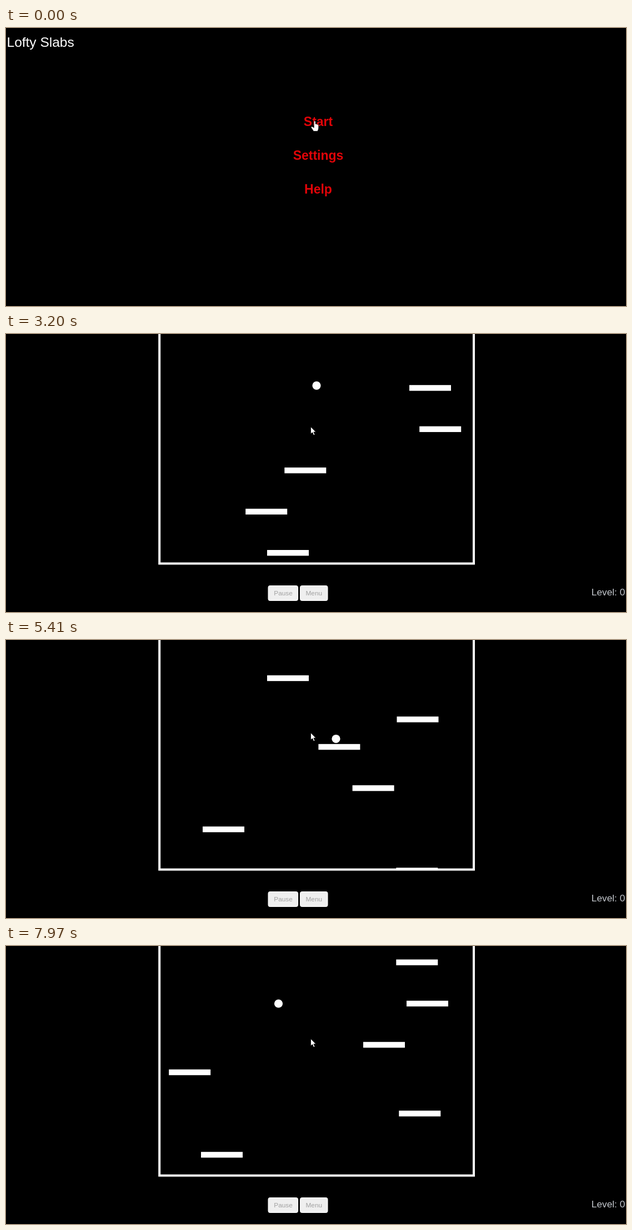
An HTML page for the animation above (8 s loop, 1116x502 px).

```html
<!DOCTYPE html>
<html lang="en">
<head>
<meta charset="utf-8">
<title>Lofty Slabs</title>
<style>
  html, body { margin: 0; width: 100%; height: 100%; overflow: hidden; background: #000; }
  svg { display: block; width: 1116px; height: 502px; }
  text { font-family: "Liberation Sans", Arial, sans-serif; }
  .title { font-size: 24.5px; fill: #fff; }
  .link { font-size: 23px; font-weight: bold; fill: #e00408; text-anchor: middle; }
  .button { fill: #efefef; stroke: #fff; }
  .label { font-size: 11.8px; fill: #a0a0a0; text-anchor: middle; }
  .level { font-size: 17.3px; fill: #c4c8ce; }
  .cursor { fill: #fff; stroke: #000; stroke-width: .8; }
</style>
</head>
<body>
<svg viewBox="0 0 1116 502">
  <clipPath id="field"><rect x="278" y="0" width="562" height="414"/></clipPath>

  <g id="menu">
    <text class="title" x="1.5" y="34">Lofty Slabs</text>
    <text class="link" x="562" y="176.5">Start</text>
    <text class="link" x="562" y="238">Settings</text>
    <text class="link" x="562" y="299">Help</text>
  </g>

  <g id="game">
    <g clip-path="url(#field)">
      <g id="bars" fill="#fff"></g>
      <circle id="ball" r="7.6" fill="#fff"/>
    </g>
    <path d="M276.2 0V414.6H842V0" fill="none" stroke="#fff" stroke-width="4"/>
    <rect class="button" x="472" y="454.5" width="53.5" height="27" rx="3"/>
    <text class="label" x="499" y="472.3">Pause</text>
    <rect class="button" x="529.5" y="454.5" width="49.5" height="27" rx="3"/>
    <text class="label" x="554.3" y="472.3">Menu</text>
    <text class="level" x="1053.8" y="472">Level: 0</text>
  </g>

  <path id="hand" class="cursor" d="M554.2 180V169.5Q554.2 167.7 555.7 167.7T557.2 169.5V173.3Q559 172.6 559.6 174Q561 173.4 561.5 174.6Q562.8 174.4 562.8 176.2V180Q562.8 183 560.8 186.5H553.6Q552 183.6 549.4 180.2Q548.4 178.6 549.8 178Q551.4 177.4 554.2 180Z"/>
  <path id="arrow" class="cursor" d="M548.5 167.5V180.5L551.5 177.8L553.8 182.8L556 181.8L553.8 177H557.8Z"/>
</svg>

<script>
const LOOP = 8000, FRAME = 1000 / 30;
const FADE_OUT_END = 830, GAME_START = 1000;
const GAP = 74.45, FIRST_Y = 200.3;

// Bar left edges, and their distance from the first bar in gaps.
const barX = [726, 744.2, 501.3, 431.2, 470, 703.5, 562.4, 623.6, 354, 702.3, 721, 643, 293.2, 707.3, 351];
const barSlot = i => i - (i > 5 ? 1 / 3 : 0) - (i > 11 ? 1 / 3 : 0);

// Keys are [frame, value].
const scroll = [[30, -223.2], [75, 0], [115, 196], [142, 330], [182, 528.3], [206, 652.3], [239, 816]];
const ballX = [[113, 559], [115, 567], [119, 585], [135, 585], [142, 551.5], [151, 594],
               [184, 594], [206, 484.6], [237, 484.6], [239, 490.5]];
const ballY = [[31, 36], [55, 49], [75, 65.5], [115, 118], [142, 160], [160, 188.4],
               [182, 79.3], [192.4, 28], [206, 49.3], [239, 104]];

const el = id => document.getElementById(id);
const menu = el('menu'), game = el('game'), ball = el('ball');
const hand = el('hand'), arrow = el('arrow');

const bars = barX.map(x => {
  const bar = document.createElementNS('http://www.w3.org/2000/svg', 'rect');
  const attrs = { x, width: 75, height: 10.4 };
  for (const name in attrs) bar.setAttribute(name, attrs[name]);
  el('bars').append(bar);
  return bar;
});

function at(keys, k) {
  if (k <= keys[0][0]) return keys[0][1];
  for (let i = 1; i < keys.length; i++) {
    const [a, from] = keys[i - 1], [b, to] = keys[i];
    if (k <= b) return from + (to - from) * (k - a) / (b - a);
  }
  return keys[keys.length - 1][1];
}

const swing = p => .5 - Math.cos(Math.PI * p) / 2;

function draw(now) {
  const k = Math.floor((now % LOOP) / FRAME + .1);
  const t = k * FRAME;
  const playing = t >= GAME_START - 1;

  menu.style.opacity = playing ? 0 : 1 - swing(Math.min(t, FADE_OUT_END) / 1000);
  game.style.opacity = playing
    ? Math.min(1, swing(Math.min(1, (t - GAME_START + FRAME) / 1000)) / swing(.83)) : 0;
  hand.style.display = playing ? 'none' : '';
  arrow.style.display = playing ? '' : 'none';

  const lift = at(scroll, k);
  bars.forEach((bar, i) => bar.setAttribute('y', FIRST_Y + GAP * barSlot(i) - lift - 5.2));
  ball.setAttribute('cx', at(ballX, k));
  ball.setAttribute('cy', at(ballY, k));
}

const start = performance.now();
function tick() {
  draw(performance.now() - start);
  requestAnimationFrame(tick);
}
tick();
</script>
</body>
</html>
```
